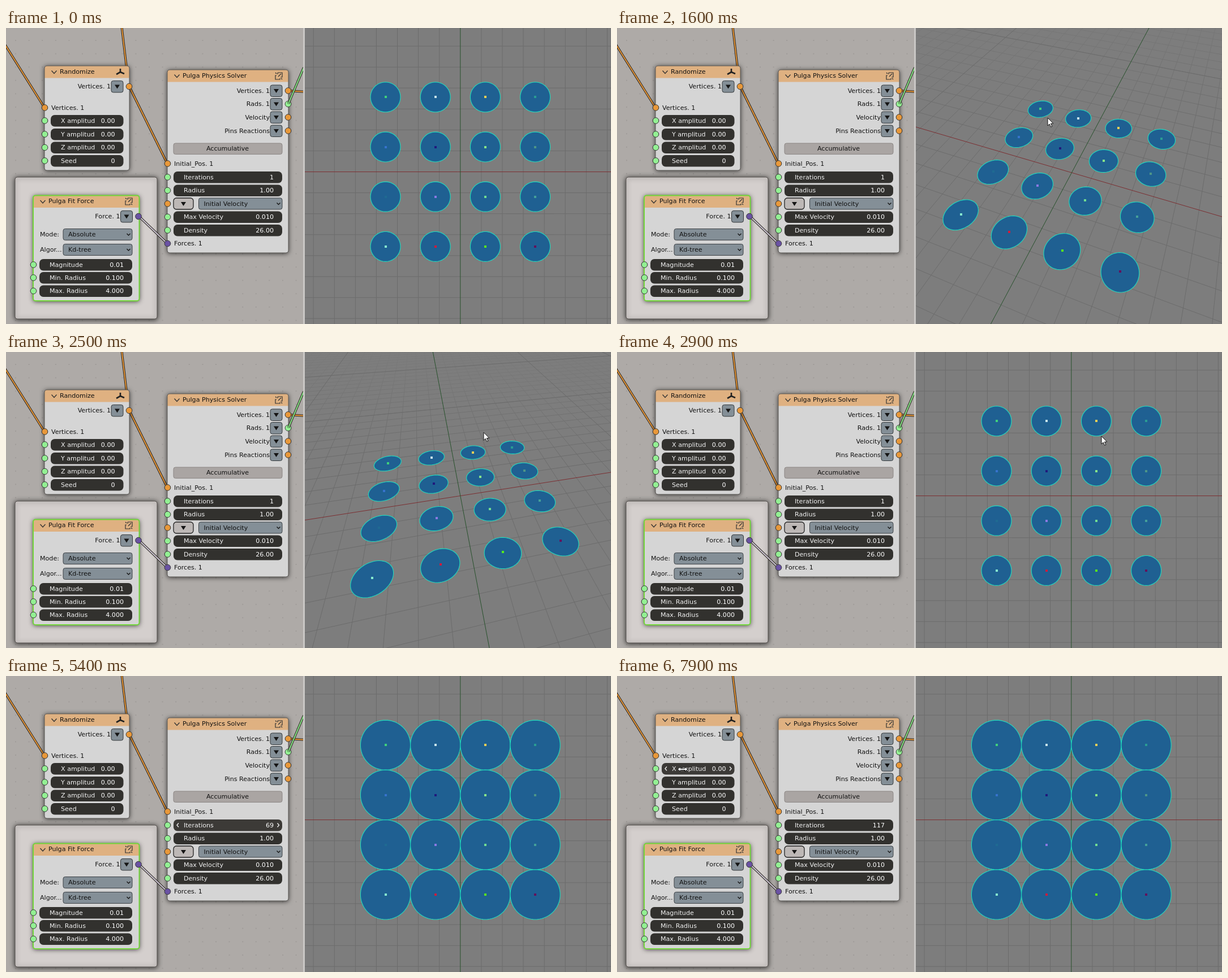
Animation, 1069 px wide and 524 px high, one loop 8000 ms. Source, as an HTML page with a canvas:

```html
<!DOCTYPE html>
<html lang="en">
<head>
<meta charset="utf-8">
<title>Circle packing with nodes</title>
<style>
html, body { margin: 0; width: 100%; height: 100%; overflow: hidden; background: #7d7d7d; }
canvas { display: block; }
</style>
</head>
<body>
<canvas id="stage" width="1069" height="524"></canvas>
<script>
const ctx = document.getElementById('stage').getContext('2d');
const LOOP = 8000, STEP = 100;
const FONT = '11.1px "DejaVu Sans", sans-serif';
const ORANGE = '#e8983a', GREEN = '#93f093', PURPLE = '#6a52a3';
const VIEW = { left: 528, cx: 802.8, cy: 254.6, scale: 44.1, depth: 0.0975, skew: 0.145, cell: 0.841 };
const DOTS = [
  '#3fd07c', '#c8e4ea', '#efcf57', '#2a9c93',
  '#3673cc', '#201a7c', '#86e58a', '#4d9488',
  '#1f6a92', '#8a79e2', '#70dc92', '#459f99',
  '#86ecd0', '#d41a3c', '#58ea1c', '#64105c'];

// Keys: [time, ...values]; the camera has yaw, tilt and a pan in x and y
const CAMERA = [[900, 0, 0, 0, 0], [1600, 19.3, 35.5, 0.6, 1.5], [2100, -3.8, 53.5, 0, 0], [2700, -18, 44, 0, 0]];
const POINTER = [
  [100, 1058, 73], [400, 960, 112], [900, 803, 252], [1600, 761, 159], [2100, 820, 129],
  [2700, 856, 149], [3200, 856, 149], [3700, 590, 200], [4100, 390, 264],
  [7100, 390, 264], [7500, 230, 160], [7700, 150, 139], [7900, 116, 165]];
const ITERATIONS = [[4400, 1], [4500, 2], [5400, 69], [6200, 116], [6300, 117]];

function sample(keys, t) {
  if (t <= keys[0][0]) return keys[0].slice(1);
  for (let i = 1; i < keys.length; i++) {
    const a = keys[i - 1], b = keys[i];
    if (t <= b[0]) {
      const u = (t - a[0]) / (b[0] - a[0]);
      return a.slice(1).map((v, j) => v + (b[j + 1] - v) * u);
    }
  }
  return keys[keys.length - 1].slice(1);
}

// ---------- drawing helpers ----------
function box(x, y, w, h, r, fill, stroke, width = 1) {
  ctx.beginPath();
  ctx.roundRect(x, y, w, h, r);
  if (fill) { ctx.fillStyle = fill; ctx.fill(); }
  if (stroke) { ctx.strokeStyle = stroke; ctx.lineWidth = width; ctx.stroke(); }
}

function path(points, { fill, stroke, width = 1, close = false }) {
  ctx.beginPath();
  points.forEach(([x, y]) => ctx.lineTo(x, y));
  if (close) ctx.closePath();
  if (fill) { ctx.fillStyle = fill; ctx.fill(); }
  if (stroke) { ctx.strokeStyle = stroke; ctx.lineWidth = width; ctx.stroke(); }
}

function text(str, x, y, color = '#111', align = 'left') {
  ctx.font = FONT;
  ctx.fillStyle = color;
  ctx.textAlign = align;
  ctx.fillText(str, x, Math.floor(y + 4));
}

function withShadow(draw) {
  ctx.save();
  ctx.shadowColor = 'rgba(0,0,0,.75)';
  ctx.shadowBlur = 8;
  ctx.shadowOffsetY = 1;
  draw();
  ctx.restore();
}

function chevron(x, y, w, h, color, width) {
  path([[x - w, y - h], [x, y + h], [x + w, y - h]], { stroke: color, width });
}

function sideArrow(x, y, dir) {
  path([[x - dir * 1.5, y - 3.5], [x + dir * 1.5, y], [x - dir * 1.5, y + 3.5]],
    { stroke: '#eee', width: 1.4 });
}

function triangle(x, y) {
  path([[x - 4.5, y - 3], [x + 4.5, y - 3], [x, y + 4]], { fill: '#151515', close: true });
}

function socket(x, y, color) {
  ctx.beginPath();
  ctx.arc(x, y, 5.3, 0, 7);
  ctx.fillStyle = color;
  ctx.fill();
  ctx.strokeStyle = '#333';
  ctx.lineWidth = 1;
  ctx.stroke();
}

function link(points, color) {
  path(points, { stroke: '#27221d', width: 4 });
  path(points, { stroke: color, width: 2 });
}

// ---------- node widgets ----------
function node(x, y, w, h, title, outline = '#5d5a57') {
  withShadow(() => box(x, y, w, h, 4, '#d5d5d5'));
  box(x, y, w, 21.5, [4, 4, 0, 0], '#dfb181');
  box(x, y, w, h, 4, null, outline, outline === '#5d5a57' ? 1 : 2);
  chevron(x + 17, y + 11, 4.5, 2.5, '#333', 1.3);
  text(title, x + 27, y + 10);
}

function popIcon(x, y) {
  const line = { stroke: '#333', width: 1.2 };
  path([[x - 2, y - 6], [x + 6, y - 6], [x + 6, y + 2], [x + 3, y + 2]], line);
  path([[x - 2, y - 6], [x - 2, y - 3]], line);
  path([[x - 1, y + 1], [x + 4, y - 4]], line);
  path([[x - 4, y - 1], [x - 6, y - 1], [x - 6, y + 6], [x + 2, y + 6], [x + 2, y + 4]], line);
  path([[x - 6, y - 6], [x - 4, y - 4]], line);
  path([[x + 4, y + 4], [x + 6, y + 6]], line);
}

function axesIcon(x, y) {
  for (const [dx, dy] of [[0, -6], [7, 3], [-7, 4]])
    path([[x + 1, y + 1], [x + 1 + dx, y + 1 + dy]], { stroke: '#222', width: 2.6 });
}

function output(label, right, y, color) {
  text(label, right - 33, y, '#111', 'right');
  box(right - 32, y - 10, 21, 20.5, 3.5, '#848f97', '#34383b');
  triangle(right - 21.5, y);
  socket(right - 0.5, y, color);
}

function dropdown(label, x, y, w) {
  box(x, y - 10, w, 20, 3.5, '#848f97', '#3c4145');
  text(label, x + 9, y);
  chevron(x + w - 6.5, y, 3, 1.6, '#1a1a1a', 1.4);
}

const FIELDS = [
  ...[['X amplitud', '0.00', 164], ['Y amplitud', '0.00', 188], ['Z amplitud', '0.00', 211.5], ['Seed', '0', 235]]
    .map(([label, value, y]) => ({ label, value, y, x: 79, w: 128.5, socket: 68.5 })),
  ...[['Iterations', '1', 264], ['Radius', '1.00', 287.5], ['Max Velocity', '0.010', 334.5], ['Density', '26.00', 358]]
    .map(([label, value, y]) => ({ label, value, y, x: 296, w: 192, socket: 285.5 })),
  ...[['Magnitude', '0.01', 419], ['Min. Radius', '0.100', 442], ['Max. Radius', '4.000', 465.5]]
    .map(([label, value, y]) => ({ label, value, y, x: 59, w: 164, socket: 48.5 }))];
const ITER_FIELD = FIELDS.find(f => f.label === 'Iterations');

function fieldAt([px, py]) {
  return FIELDS.find(f => px > f.x && px < f.x + f.w && Math.abs(py - f.y) < 10);
}

function field(f, value, active) {
  box(f.x, f.y - 10, f.w, 20.5, 7, active ? '#3c3a37' : '#32312e');
  text(f.label, f.x + 18, f.y, '#f2f2f2');
  text(value, f.x + f.w - 15, f.y, '#fff', 'right');
  if (active) {
    sideArrow(f.x + 7.5, f.y, -1);
    sideArrow(f.x + f.w - 7, f.y, 1);
  }
  socket(f.socket, f.y, GREEN);
}

function drawEditor(iterations, active) {
  ctx.save();
  ctx.beginPath();
  ctx.rect(0, 0, 525, 524);
  ctx.clip();
  ctx.fillStyle = '#aeaaa7';
  ctx.fillRect(0, 0, 525, 524);
  ctx.fillStyle = '#a09c99';
  for (let x = 16; x < 525; x += 23.6)
    for (let y = 21; y < 524; y += 23.6) ctx.fillRect(x, y, 2, 2);

  withShadow(() => box(16, 264, 251, 251, 4, '#d4cfcd', '#56524f'));
  link([[-2, 29], [68, 141]], ORANGE);
  link([[204.5, -2], [213, 70]], ORANGE);
  link([[218, 104], [285, 240]], ORANGE);
  link([[498, 111], [528, 113]], ORANGE);

  node(68, 67, 150, 185, 'Randomize');
  axesIcon(201, 77);
  output('Vertices. 1', 218, 103.5, ORANGE);
  text('Vertices. 1', 80, 141);
  socket(68.5, 141, ORANGE);

  node(285, 74, 214, 324, 'Pulga Physics Solver');
  popIcon(482, 85);
  output('Vertices. 1', 499, 111, ORANGE);
  output('Rads. 1', 499, 134.5, GREEN);
  output('Velocity', 499, 158, ORANGE);
  output('Pins Reactions', 499, 182, ORANGE);
  box(296, 204, 192, 19.5, 3.5, '#aaa5a3', '#8b8684');
  text('Accumulative', 391.5, 213.5, '#111', 'center');
  text('Initial_Pos. 1', 297, 240);
  socket(285.5, 240, ORANGE);
  box(296, 301, 35, 20, 5, '#bdb8b6', '#222', 1.3);
  triangle(313.5, 311);
  dropdown('Initial Velocity', 340.5, 311, 147.5);
  socket(285.5, 311, ORANGE);
  text('Forces. 1', 297, 381.5);

  node(48, 296.5, 187.5, 186.5, 'Pulga Fit Force', '#72d53a');
  popIcon(217, 307);
  link([[235, 333.5], [285, 381.5]], '#cfc8d6');
  output('Force. 1', 234.5, 333.5, PURPLE);
  socket(285.5, 381.5, PURPLE);
  text('Mode:', 60, 365);
  dropdown('Absolute', 101, 365.5, 122);
  text('Algor...', 60, 392);
  dropdown('Kd-tree', 101, 392.5, 122);

  for (const f of FIELDS) field(f, f === ITER_FIELD ? String(iterations) : f.value, f === active);
  link([[499, 134], [526, 70]], '#86e486');
  ctx.restore();
  ctx.fillStyle = '#c9c7c5';
  ctx.fillRect(525, 0, 3, 524);
}

// ---------- 3D viewport ----------
function makeCamera([yawDeg, tiltDeg, panX, panY]) {
  const yaw = yawDeg * Math.PI / 180, tilt = tiltDeg * Math.PI / 180;
  const c = Math.cos(yaw), s = Math.sin(yaw), ct = Math.cos(tilt), st = Math.sin(tilt);
  const depth = (x, y) => 1 + VIEW.depth * st * (y * c - x * s);
  const project = (x, y) => {
    const away = y * c - x * s, k = VIEW.scale / depth(x, y);
    return [VIEW.cx + panX + k * (x * c + y * s + VIEW.skew * st * away), VIEW.cy + panY - k * away * ct];
  };
  return { depth, project };
}

function groundLine(cam, a, b, color) {
  const near = 0.08, da = cam.depth(...a), db = cam.depth(...b);
  if (da < near && db < near) return;
  const u = (near - da) / (db - da);
  const cut = [a[0] + (b[0] - a[0]) * u, a[1] + (b[1] - a[1]) * u];
  path([cam.project(...(da < near ? cut : a)), cam.project(...(db < near ? cut : b))], { stroke: color });
}

function grid(cam, cell, count, color) {
  const end = 90;
  for (let i = -count; i <= count; i++) {
    if (!i) continue;
    const p = i * cell;
    groundLine(cam, [p, -end], [p, end], color);
    groundLine(cam, [-end, p], [end, p], color);
  }
}

function drawViewport(view, radius) {
  const cam = makeCamera(view), tilt = view[1];
  ctx.save();
  ctx.beginPath();
  ctx.rect(VIEW.left, 0, 541, 524);
  ctx.clip();
  ctx.fillStyle = '#7d7d7d';
  ctx.fillRect(VIEW.left, 0, 541, 524);
  grid(cam, VIEW.cell, 45, '#6c6c6c');
  if (tilt) {
    const haze = ctx.createLinearGradient(0, 0, 0, 190);
    haze.addColorStop(0, `rgba(125,125,125,${Math.min(0.95, tilt / 56)})`);
    haze.addColorStop(1, 'rgba(125,125,125,0)');
    ctx.fillStyle = haze;
    ctx.fillRect(VIEW.left, 0, 541, 190);
    grid(cam, VIEW.cell * 10, 8, '#6c6c6c');
  }
  groundLine(cam, [-90, 0], [90, 0], '#7c2f32');
  groundLine(cam, [0, -90], [0, 90], '#29522d');

  DOTS.forEach((color, i) => {
    const x = (i % 4) * 2 - 3, y = 3 - Math.floor(i / 4) * 2;
    const rim = Array.from({ length: 72 }, (_, j) => {
      const a = j * Math.PI / 36;
      return cam.project(x + radius * Math.cos(a), y + radius * Math.sin(a));
    });
    path(rim, { fill: '#1f6092', stroke: '#1fdcc0', width: 1.1, close: true });
    const [px, py] = cam.project(x, y);
    ctx.fillStyle = color;
    ctx.fillRect(Math.round(px) - 2, Math.round(py) - 2, 4, 4);
  });
  ctx.restore();
}

function drawPointer([x, y], sideways) {
  const at = points => points.map(([dx, dy]) => [x + dx, y + dy]);
  const style = { fill: '#fff', stroke: '#111', width: 1, close: true };
  if (sideways) {
    path(at([[-9, 0], [-4, -4], [-4, -1.5], [4, -1.5], [4, -4], [9, 0], [4, 4], [4, 1.5], [-4, 1.5], [-4, 4]]), style);
  } else {
    path(at([[0, 0], [0, 14], [3.2, 11], [5.6, 16.2], [7.8, 15.2], [5.4, 10.2], [9.8, 10]]), style);
  }
}

function render(now) {
  const t = Math.floor((now % LOOP) / STEP) * STEP;
  const orbiting = t >= 1000 && t < 2900;
  const view = orbiting ? sample(CAMERA, t) : [0, 0, 0, 0];
  const iterations = Math.round(sample(ITERATIONS, t)[0]);
  const radius = Math.min(1, 0.6 + 0.4 * Math.max(0, iterations - 2) / 64);
  const dragging = t >= 4300 && t < 6800;
  const pointer = sample(POINTER, t);
  const active = fieldAt(pointer);

  drawViewport(view, radius);
  drawEditor(iterations, active);
  if (t >= 100 && !dragging) drawPointer(pointer, !!active);
}

function frame() {
  render(performance.now());
  requestAnimationFrame(frame);
}
frame();
</script>
</body>
</html>
```
